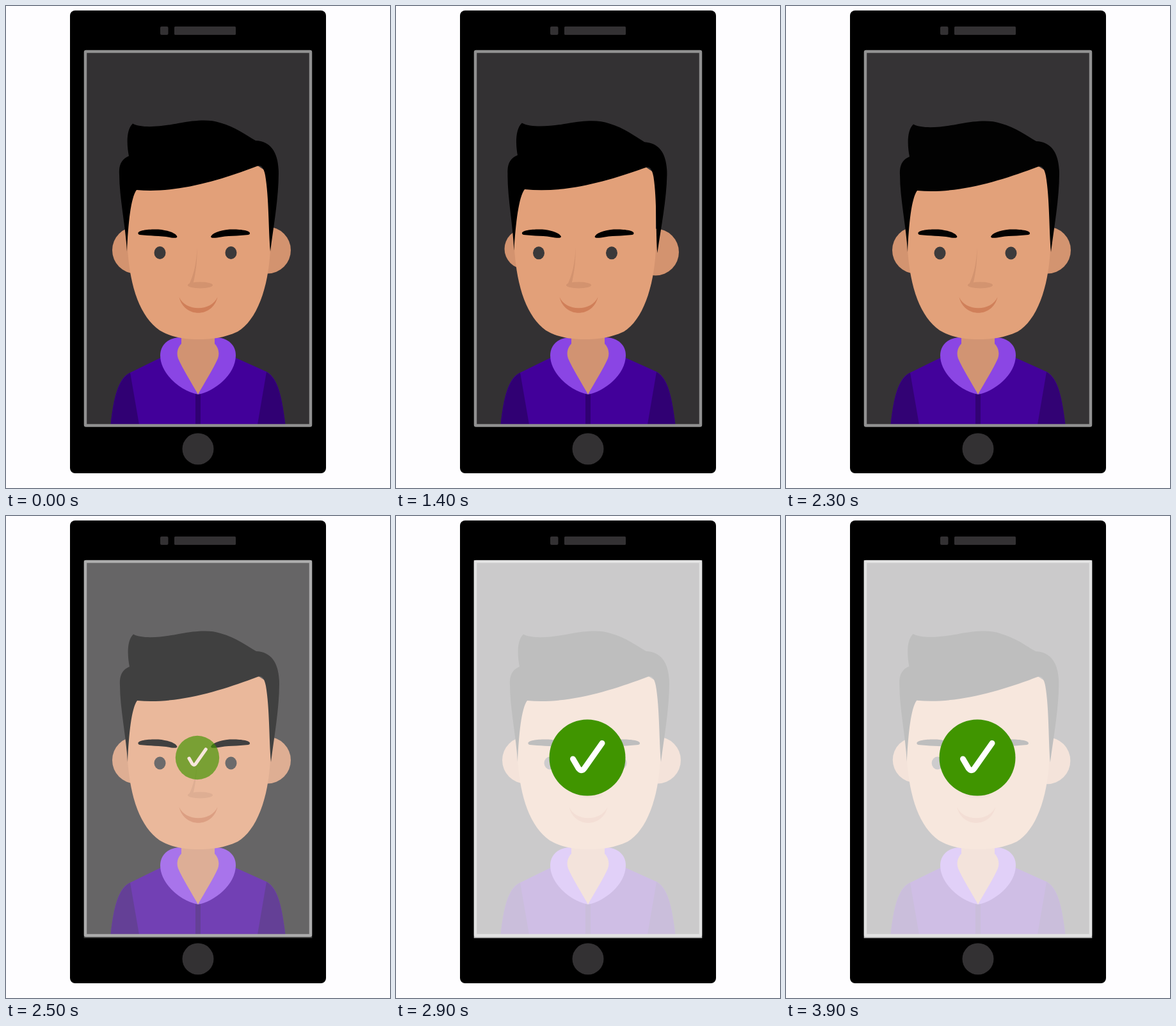
Write an HTML page that moves like this. It is 600 px wide and 752 px high and loops after 4000 ms.

```html
<!DOCTYPE html>
<html lang="en">
<head>
<meta charset="utf-8">
<title>Face check</title>
<style>
  html, body { margin: 0; width: 100%; height: 100%; overflow: hidden; background: #fefdff; }
  svg { display: block; width: 600px; height: 752px; }
</style>
</head>
<body>
<svg viewBox="0 0 600 752">
  <defs>
    <path id="brow" d="M206.5 355C205 350 222 348 238 348.5C255 350 266 355 267.5 360C267 362 264 362 258 361.5C242 358 225 359 209 357Q206.5 356.5 206.5 355Z"/>
  </defs>

  <rect x="100" y="7" width="400" height="722" rx="8"/>
  <g fill="#333133">
    <rect x="241" y="32" width="12.5" height="13" rx="2"/>
    <rect x="263" y="32" width="96" height="13" rx="1.5"/>
    <circle cx="300" cy="691" r="24.5"/>
    <rect x="124" y="71" width="352" height="584"/>
  </g>

  <path fill="#42009a" d="M163.500 653C168 612 175 582 192 573L243 548H357L408 571C426 582 431 612 436.500 653Z"/>
  <g fill="#300073">
    <path d="M163.500 653C168 612 175 582 194 572L208 653Z"/>
    <path d="M436.500 653C431 612 426 582 407 571L393 653Z"/>
    <rect x="296" y="603" width="8" height="50"/>
  </g>
  <path fill="#8a45e4" d="M274 517C252 517 241 530 241 545C241 575 275 602 300 606C325 602 359 575 359 545C359 530 348 517 326 517Z"/>
  <path fill="#d19372" d="M274 500H326V527C332 533 334 542 331 550C324 566 310 588 300 606C290 588 276 566 269 550C266 542 268 533 274 527Z"/>

  <g fill="#d3936f">
    <circle id="earL"/>
    <circle id="earR"/>
  </g>
  <path id="face" fill="#e2a079"/>
  <path id="hair" d="M190 384C188 345 178 300 178 264C177 250 181 240 193 235C190 220 188 195 199 184.500C215 193 250 188 270 184C300 178.500 320 178 335 183C360 190 375 202 391 211C415 212 427 230 427 262C427 300 419 345 414 384C411 350 412 300 406 265C403 250 398 249 393 251C340 271 270 294 205 288C196 300 192 340 190 384Z"/>
  <g id="brows">
    <use href="#brow"/>
    <use href="#brow" transform="translate(587.500) scale(-1 1)"/>
  </g>
  <g fill="#3b393a">
    <ellipse id="eyeL" cx="240.500" cy="385.500" rx="9" ry="10"/>
    <ellipse id="eyeR" cx="351.500" cy="385.500" rx="9" ry="10"/>
  </g>
  <g id="nose" fill="#d3936f">
    <path d="M298.500 377C298 400 293 422 285 436L292 435C297 415 299 395 298.500 377Z"/>
    <ellipse cx="303.500" cy="435.500" rx="19.500" ry="5"/>
  </g>
  <path id="mouth" fill="#d07f59" d="M270.500 454C280 477 321 477 330.500 454C323 487 278 487 270.500 454Z"/>

  <rect x="124" y="71" width="352" height="583.500" rx="1" fill="none" stroke="#919191" stroke-width="4.500"/>
  <rect id="veil" x="121.700" y="69" width="356.600" height="589.500" fill="#fff"/>
  <g id="badge">
    <circle r="59.500" fill="#409500"/>
    <path d="M-22.500 2L-14 16.500Q-9 23 -4.500 16.500L23 -22.500" fill="none" stroke="#fff" stroke-width="9" stroke-linecap="round" stroke-linejoin="round"/>
  </g>
</svg>
<script>
const LOOP = 4000, STEP = 100;
const el = id => document.getElementById(id);
const set = (id, attrs) => {
  for (const k in attrs) el(id).setAttribute(k, attrs[k]);
};
const smooth = u => (1 - Math.cos(Math.PI * u)) / 2;
const linear = u => u;
const easeIn = u => u * u;

// rows: [time, value, easing towards this value]
const turnKeys = [[0, 0], [450, 1, smooth], [1400, -1, smooth], [2100, 0, smooth], [2950, 0, linear], [3900, -0.22, easeIn]];
const liftKeys = [[0, -1], [2200, 0, linear]];
const veilKeys = [[2295, 0], [2900, 0.745, linear]];
const sizeKeys = [[2350, 0], [2400, 0.2, linear], [2500, 0.575, linear], [2600, 0.82, linear], [2700, 0.96, linear], [2800, 1, linear]];
const fadeKeys = [[2350, 0], [2500, 0.66, linear], [2700, 0.96, linear], [2800, 1, linear]];

function at(keys, t) {
  if (t <= keys[0][0]) return keys[0][1];
  for (let i = 1; i < keys.length; i++) {
    const [t0, a] = keys[i - 1], [t1, b, ease] = keys[i];
    if (t < t1) return a + (b - a) * ease((t - t0) / (t1 - t0));
  }
  return keys[keys.length - 1][1];
}

const shift = (id, x, y = 0) => set(id, { transform: `translate(${x} ${y})` });

function facePath(l, r) {
  const m = (l + r) / 2;
  return `M${190 + l} 262L${393 + m} 249L${413 + r} 262V380` +
    `C${410 + r} 440 ${392 + r} 490 ${362 + m} 508C${340 + m} 518 ${322 + m} 520 ${300 + m} 520` +
    `C${280 + m} 520 ${258 + m} 517 ${240 + m} 506C${210 + l} 485 ${194 + l} 440 ${190 + l} 380Z`;
}

function draw(t) {
  const k = at(turnKeys, t), lift = at(liftKeys, t);
  const left = Math.max(-k, 0), right = Math.max(k, 0);

  set("earL", { cx: 202.5 - 2 * left + 3 * right, cy: 381 - 2 * left + 3 * right, r: 36.5 - 5.5 * left });
  set("earR", { cx: 408.5 - 3 * left + 2 * right, cy: 381 + 3 * left - 2 * right, r: 36.5 - 5.5 * right });
  set("face", { d: facePath(7 * right - 5 * left, 5 * right - 7 * left) });
  set("hair", { transform: `translate(${3.5 * k + lift} ${lift}) rotate(${-k} 300 280)` });
  shift("brows", 9.5 * k);
  shift("eyeL", 14.5 * right - 17.5 * left, lift / 2);
  shift("eyeR", 17.5 * right - 14.5 * left, lift / 2);
  shift("nose", 18 * k);
  shift("mouth", 15 * k);

  set("veil", { opacity: at(veilKeys, t) });
  set("badge", {
    transform: `translate(299 377) scale(${at(sizeKeys, t)})`,
    opacity: at(fadeKeys, t)
  });
}

const start = performance.now();
function tick() {
  const t = (performance.now() - start) % LOOP;
  draw(Math.floor(t / STEP) * STEP);
  requestAnimationFrame(tick);
}
tick();
</script>
</body>
</html>
```
